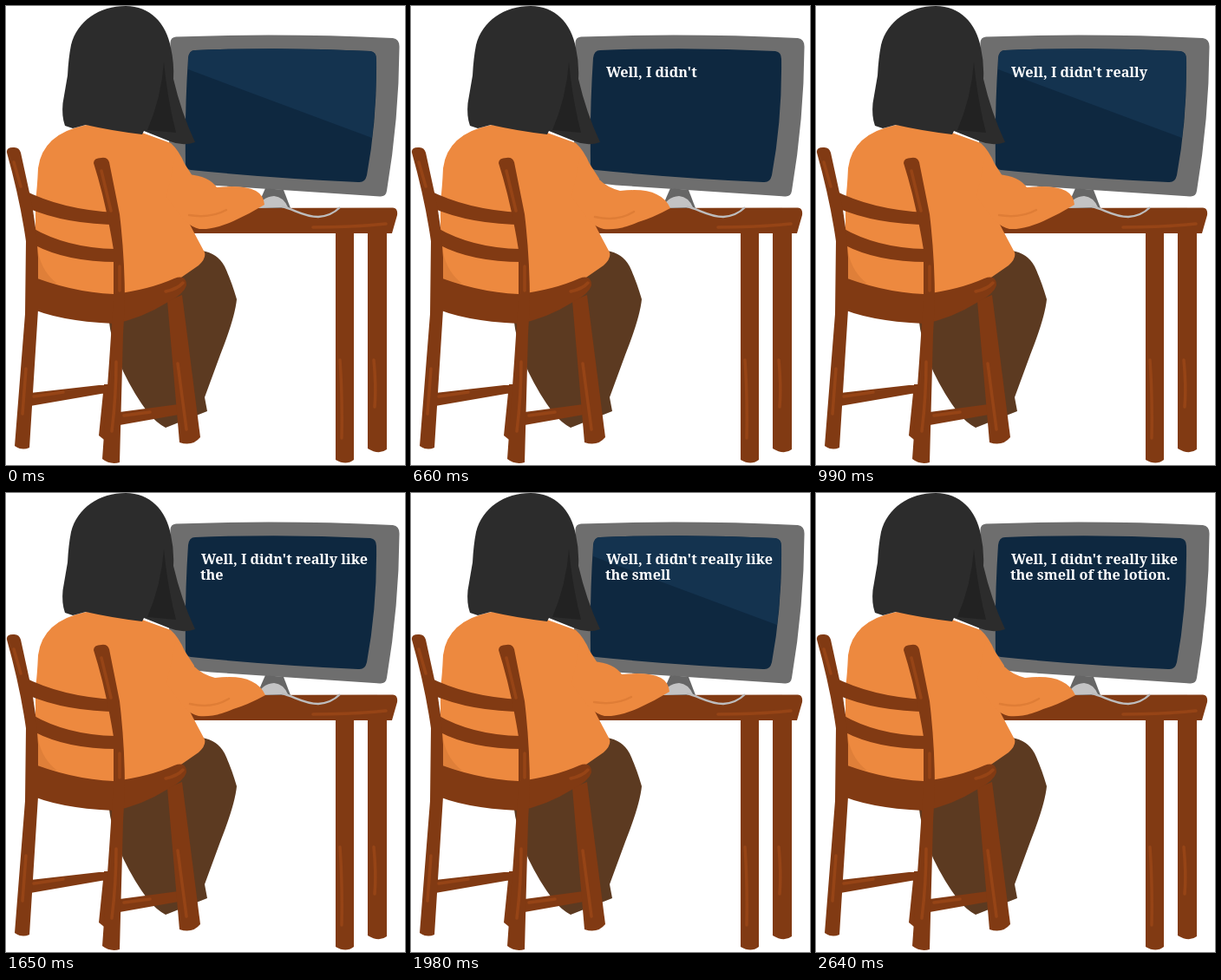
These frames come from a looping animation (460 by 529 pixels, 2970 ms). An HTML page:

```html
<!DOCTYPE html>
<html lang="en">
<head>
<meta charset="utf-8">
<title>Typing at a desk</title>
<style>
  html, body { margin: 0; width: 100%; height: 100%; overflow: hidden; background: #fff; }
  svg { display: block; width: 100%; height: 100%; }
  text { font: bold 16.2px "Noto Serif", serif; fill: #fff; }
  .wood { fill: #813a13; }
  .shine { fill: none; stroke: #964416; stroke-width: 3.5; stroke-linecap: round; }
  .cloth { fill: #ed893f; }
  .fold { fill: none; stroke: #df7d36; stroke-width: 2.5; stroke-linecap: round; }
</style>
</head>
<body>
<svg viewBox="0 0 460 529">
  <g id="monitor">
    <path fill="#6e6e6e" d="M196 35.5Q320 31 446 37Q454 38 453.500 48Q453 130 439 213Q438 220 431 219.500L236 206.500L205 203L188 165L189.500 44Q189 36 196 35.5Z"/>
    <path fill="#0e2840" d="M218 51Q320 47 420 52Q427 53 427 61Q428 130 416 195Q414 204 406 203Q300 198 213 189Q207 188 207 182Q206 120 210 60Q211 51 218 51Z"/>
    <path id="glare" fill="#14334f" d="M210 73L210 60Q211 51 218 51Q320 47 420 52Q427 53 427 61Q427 108 422 152Z"/>
    <text id="line1" x="225" y="82"></text>
    <text id="line2" x="224" y="100.3"></text>
    <path fill="#666" d="M299 210L320 212L328 233H289Z"/>
  </g>

  <g id="desk">
    <path class="wood" d="M200 233L446 232.500Q452 233 451 241L445 262H200ZM380 260H401V523Q392 530 380 523ZM417 260H439V511Q430 518 417 510Z"/>
    <path class="shine" d="M354 255Q400 255 438 251M385 408Q388 450 387 498M424 408Q427 440 425 462"/>
  </g>
  <path id="mouse" fill="#c3c3c4"/>
  <path fill="none" stroke="#bdbdbe" stroke-width="2.4" d="M318 231C332 234 343 243 360 243Q375 242 385 232"/>

  <path fill="#5c3a21" d="M226 282Q244 285 252 300Q260 317 266 338Q264 359 247 402L229 451L232 467L184 486Q173 480 164 469Q148 448 135 421Q121 387 118 358L195 312Z"/>
  <path class="cloth" d="M93 137L157 146L190 158Q199 166 206 182L217 199L204 236Q217 262 229 284Q231 291 222 299L196 317L130 338L36 320L34 270V225Q36 210 37 187Q42 147 93 137Z"/>
  <path fill="#df7f39" d="M37 284Q42 307 59 320L37 316Z"/>
  <path id="arm" class="cloth"/>
  <path id="crease" class="fold"/>

  <g id="hair">
    <path fill="#2c2c2c" d="M138 0C166 0 185 20 190 48Q194 66 193 84Q202 123 218 157Q204 162 189 156L159 144L157 148Q123 144 92 137L77 141L68 138Q64 127 65.500 112L71 80Q72 60 75 45C82 17 108 0 138 0Z"/>
    <path fill="#222" d="M182 65Q179 106 163 143L196 146Q186 107 182 65Z"/>
  </g>

  <g id="chair">
    <path class="wood" d="M113 436L119 436L117 503L107 495ZM28 446L116 436L115 446L28 461ZM131 468L199 459V471L131 483Z"/>
    <path class="wood" d="M186 340L203 333L224 497Q215 508 200 503Z"/>
    <path class="wood" d="M20 212Q65 235 127 238L131 252Q70 252 25 233ZM29 255Q70 279 126 280L128 295Q70 295 32 275Z"/>
    <path class="wood" d="M23 309Q75 330 124 332Q165 327 194 314Q208 309 208 322Q205 332 187 341Q155 361 124 366Q58 363 23 346Z"/>
    <path class="wood" d="M1 169Q0 163 8 163Q15 162 17 169L27 215Q35 250 37 290V350L27 509Q18 513 10 507L22 355L23 271Q16 222 1 169Z"/>
    <path class="wood" d="M101 181Q101 175 110 175Q117 174 119 180L131 240Q137 290 137 342L135 378L131 526Q120 529 111 522L119 410L122 365L124 340V281Q115 225 101 181Z"/>
    <path class="shine" d="M9 180L17 208M110 190L121 236M23 418L19 470M127 410Q127 450 122 490M198 412L208 488M131 300V328M184 329Q198 326 204 319M32 450L66 445M136 472L166 468"/>
  </g>
</svg>
<script>
const STEP = 330;
const words = "Well, I didn't really like the smell of the lotion.".split(" ");
const typed = [0, 2, 3, 4, 5, 6, 7, 8, 10];
const FIRST_LINE = 5;

const lowMouse = "M290 233Q295 220 309 219Q320 220 325 232Z";
const poses = [
  { // hand sliding over the mouse
    glare: true,
    mouse: lowMouse,
    arm: "M196 168L210 194Q234 196 243 209Q274 206 288 213Q297 218 298 229Q280 240 262 248Q240 258 223 257Q211 254 202 243L185 220Z",
    crease: "M211 241Q236 245 254 235"
  },
  { // hand lifted
    glare: true,
    mouse: "M285 233Q291 220 306 219Q320 220 327 232Z",
    arm: "M192 168L203 180Q224 182 230 197Q252 192 278 193Q297 195 303 216Q301 222 287 222Q267 235 248 239Q224 243 204 232L185 215Z",
    crease: "M228 234Q250 233 266 223"
  },
  { // hand resting
    glare: false,
    mouse: lowMouse,
    arm: "M196 168L217 200Q226 209 241 213Q270 210 283 217Q294 222 299 233Q279 244 262 249Q240 259 222 257Q210 254 202 243L185 220Z",
    crease: "M212 243Q238 249 257 237"
  }
];

const el = id => document.getElementById(id);
let shown = -1;

function draw(step) {
  const pose = poses[step % poses.length];
  for (const part of ["mouse", "arm", "crease"]) el(part).setAttribute("d", pose[part]);
  el("glare").style.display = pose.glare ? "" : "none";
  const visible = words.slice(0, typed[step]);
  el("line1").textContent = visible.slice(0, FIRST_LINE).join(" ");
  el("line2").textContent = visible.slice(FIRST_LINE).join(" ");
}

function tick() {
  const step = Math.floor(performance.now() / STEP) % typed.length;
  if (step !== shown) draw(shown = step);
  requestAnimationFrame(tick);
}
tick();
</script>
</body>
</html>
```
